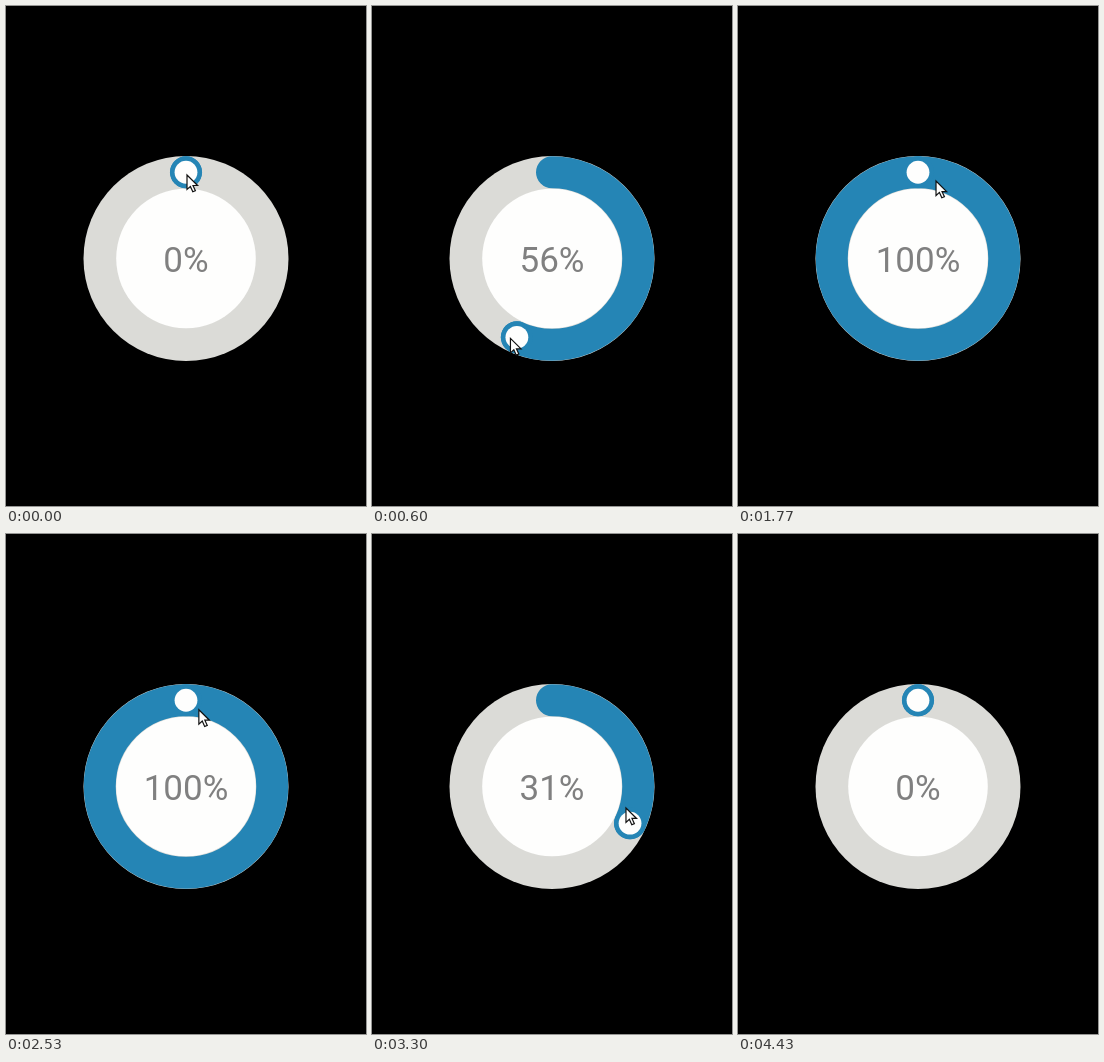
An HTML page with a canvas for the animation above (4.46 s loop, 360x500 px).

```html
<!DOCTYPE html>
<html lang="en">
<head>
<meta charset="utf-8">
<title>Circular slider</title>
<style>
  html, body { margin: 0; width: 100%; height: 100%; overflow: hidden; background: #000; }
  canvas { display: block; }
</style>
</head>
<body>
<canvas id="stage" width="360" height="500"></canvas>
<script>
const ctx = document.getElementById('stage').getContext('2d');
const LOOP = 4460, LAG = 15, HIDE_POINTER = 4300;
const CX = 180, CY = 252.5, RADIUS = 86.25;
const BLUE = '#2585b5', TRACK = '#dbdbd7', WHITE = '#fefefd', GRAY = '#808080';

// The drag, out and back: time in ms, percent of a turn, distance from centre
const drag = [
  { t: 0, turn: 0, reach: 84.5 },
  { t: 600, turn: 57.8, reach: 89.6 },
  { t: 1130, turn: 88.8, reach: 82.5 },
  { t: 1600, turn: 103.4, reach: 80.3 },
  { t: 2400, turn: 103.4, reach: 80.3 },
  { t: 2970, turn: 81.1, reach: 68.3 },
  { t: 3590, turn: -1.6, reach: 81.9 },
  { t: LOOP, turn: -1.6, reach: 81.9 },
];

const arrow = new Path2D('M0 0V14.5L3.4 11.4L5.8 16.8L8.4 15.7L6 10.5H10.6Z');

function slope(key, i) {
  const a = drag[i - 1], b = drag[i], c = drag[i + 1];
  if (!a || !c) return 0;
  const left = (b[key] - a[key]) / (b.t - a.t);
  const right = (c[key] - b[key]) / (c.t - b.t);
  return left * right <= 0 ? 0 : (left + right) / 2;
}

// Cubic curve through the drag points, flat at turning points
function sample(key, t) {
  const i = drag.findIndex(p => p.t > t) - 1;
  const a = drag[i], b = drag[i + 1];
  const d = b.t - a.t, u = (t - a.t) / d, w = 1 - u;
  return a[key] * (1 + 2 * u) * w * w + b[key] * (3 - 2 * u) * u * u
    + d * u * w * (slope(key, i) * w - slope(key, i + 1) * u);
}

const angle = percent => (percent / 50 - .5) * Math.PI;

function polar(percent, r) {
  const a = angle(percent);
  return [CX + r * Math.cos(a), CY + r * Math.sin(a)];
}

function disc(x, y, r, color) {
  ctx.fillStyle = color;
  ctx.beginPath();
  ctx.arc(x, y, r, 0, 2 * Math.PI);
  ctx.fill();
}

function drawPointer(t) {
  ctx.save();
  ctx.translate(...polar(sample('turn', t), sample('reach', t)));
  ctx.translate(1, 1);
  ctx.fillStyle = WHITE;
  ctx.strokeStyle = '#111';
  ctx.lineWidth = 1.2;
  ctx.fill(arrow);
  ctx.stroke(arrow);
  ctx.restore();
}

function draw(t) {
  const pulled = sample('turn', Math.max(0, t - LAG));
  const percent = Math.min(100, Math.max(0, pulled));
  const [x, y] = polar(percent, RADIUS);

  ctx.fillStyle = '#000';
  ctx.fillRect(0, 0, 360, 500);
  disc(CX, CY, 102.5, TRACK);
  disc(CX, CY, 69.8, WHITE);

  ctx.strokeStyle = BLUE;
  ctx.lineWidth = 32;
  ctx.lineCap = 'round';
  ctx.beginPath();
  ctx.arc(CX, CY, RADIUS, angle(0), angle(percent));
  ctx.stroke();
  disc(x, y, 16, BLUE);
  disc(x, y, 11.4, WHITE);

  ctx.fillStyle = GRAY;
  ctx.font = '35px Roboto, sans-serif';
  ctx.textAlign = 'center';
  ctx.fillText(Math.floor(percent) + '%', CX, 265.5);

  if (t < HIDE_POINTER) drawPointer(t);
}

const start = performance.now();
function tick() {
  draw(Math.max(0, performance.now() - start) % LOOP);
  requestAnimationFrame(tick);
}
tick();
</script>
</body>
</html>
```
